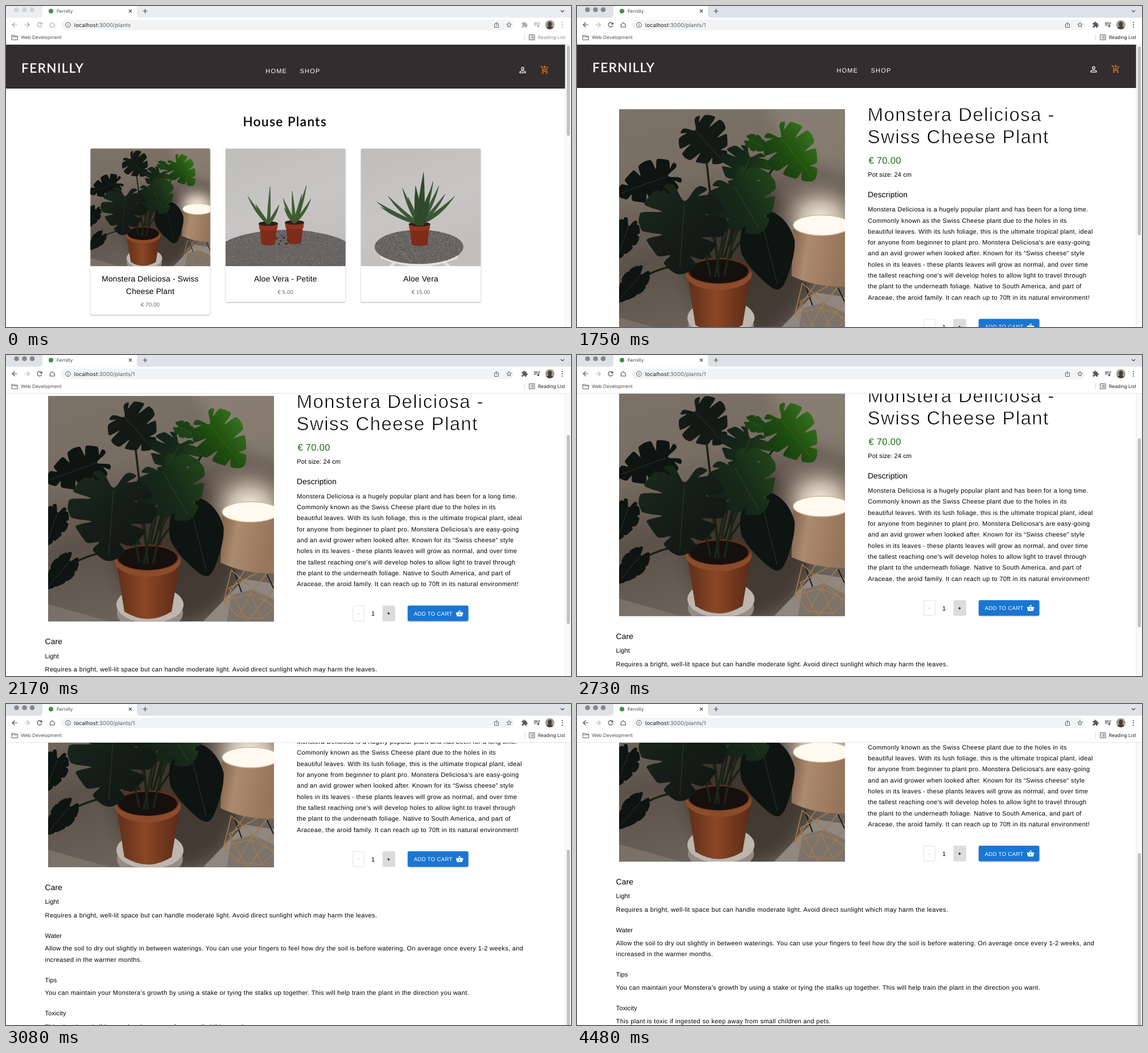
An HTML page for the animation above (4550 ms loop, 993 px wide and 564 px high).

```html
<!DOCTYPE html>
<html lang="en">
<head>
<meta charset="utf-8">
<title>Fernilly</title>
<style>
  html, body { margin: 0; width: 100%; height: 100%; overflow: hidden; background: #fff; }
  svg { display: block; width: 993px; height: 564px; }
  text { font: 11.03px "Liberation Sans", Arial, sans-serif; letter-spacing: .1px; text-rendering: geometricPrecision; white-space: pre; }
  .ui { font: 8.3px Inter, sans-serif; letter-spacing: 0; }
  .url { font: 9.66px Inter, sans-serif; letter-spacing: 0; fill: #5f6368; }
  .brand { font: 22.5px Lato, sans-serif; letter-spacing: 1.5px; stroke-width: .4; stroke-linejoin: round; }
  .nav { letter-spacing: 1.2px; fill: #fff; }
  .title { font-size: 33.1px; letter-spacing: 1.4px; stroke: #fff; stroke-width: .75; }
  .price { font-size: 16.5px; letter-spacing: .3px; fill: #176d10; }
  .head { font-size: 13.8px; }
  .body { letter-spacing: .345px; }
  .name { font-size: 13.8px; letter-spacing: .18px; text-anchor: middle; }
  .cost { font-size: 9.66px; text-anchor: middle; fill: #666; }
  .button { font-size: 9.66px; letter-spacing: .28px; fill: #fff; }
  .raised { filter: drop-shadow(0 1px 1px rgba(0,0,0,.32)); }
</style>
</head>
<body>
<svg id="stage" viewBox="0 0 993 564"></svg>
<script>
const LOOP = 4550, STEP = 70;
let seed = 7;
const random = () => (seed = seed * 16807 % 2147483647) / 2147483647;
const text = (x, y, string, cls = '', more = '') => `<text x="${x}" y="${y}" class="${cls}" ${more}>${string}</text>`;
const rect = (x, y, w, h, fill, more = '') => `<rect x="${x}" y="${y}" width="${w}" height="${h}" fill="${fill}" ${more}/>`;
const ellipse = (x, y, rx, ry, fill, more = '') => `<ellipse cx="${x}" cy="${y}" rx="${rx}" ry="${ry}" fill="${fill}" ${more}/>`;
const shape = (d, fill, more = '') => `<path d="${d}" fill="${fill}" ${more}/>`;
const line = (d, color, width = 1, more = '') => shape(d, 'none', `stroke="${color}" stroke-width="${width}" ${more}`);
const icon = (d, x, y, size, fill, more = '') =>
  shape(d, fill, `transform="translate(${x - size / 2} ${y - size / 2}) scale(${size / 24})" ${more}`);
const gradient = (id, stops, more = '', kind = 'linear') => `<${kind}Gradient id="${id}" ${more}>` +
  stops.map(([offset, color, alpha = 1]) => `<stop offset="${offset}" stop-color="${color}" stop-opacity="${alpha}"/>`).join('') +
  `</${kind}Gradient>`;

const ICONS = {
  back: 'M20 11H7.83l5.59-5.59L12 4l-8 8 8 8 1.41-1.41L7.83 13H20v-2z',
  forward: 'M12 4l-1.41 1.41L16.17 11H4v2h12.17l-5.58 5.59L12 20l8-8z',
  reload: 'M17.65 6.35C16.2 4.9 14.21 4 12 4c-4.42 0-8 3.58-8 8s3.58 8 8 8c3.73 0 6.84-2.55 7.73-6h-2.08c-.82 2.33-3.04 4-5.65 4-3.31 0-6-2.69-6-6s2.69-6 6-6c1.66 0 3.14.69 4.22 1.78L13 11h7V4z',
  home: 'M12 3L3 11v10h18V11zM5 12l7-6.3 7 6.3v7H5z',
  star: 'M22 9.24l-7.19-.62L12 2 9.19 8.63 2 9.24l5.46 4.73L5.82 21 12 17.27 18.18 21l-1.63-7.03zM12 15.4l-3.76 2.27 1-4.28-3.32-2.88 4.38-.38L12 6.1l1.71 4.04 4.38.38-3.32 2.88 1 4.28z',
  puzzle: 'M20.5 11H19V7a2 2 0 0 0-2-2h-4V3.5a2.5 2.5 0 0 0-5 0V5H4a2 2 0 0 0-2 2v3.8h1.5a2.7 2.7 0 0 1 0 5.4H2V20a2 2 0 0 0 2 2h3.8v-1.5a2.7 2.7 0 0 1 5.4 0V22H17a2 2 0 0 0 2-2v-4h1.5a2.5 2.5 0 0 0 0-5z',
  queue: 'M15 6H3v2h12zm0 4H3v2h12zM3 16h8v-2H3zM17 6v8.18a3 3 0 1 0 2 2.82V8h3V6z',
  person: 'M12 5.9a2.1 2.1 0 1 1 0 4.2a2.1 2.1 0 1 1 0-4.2m0 9c2.97 0 6.1 1.46 6.1 2.1v1.1H5.9V17c0-.64 3.13-2.1 6.1-2.1M12 4a4 4 0 1 0 0 8a4 4 0 1 0 0-8zm0 9c-2.67 0-8 1.34-8 4v3h16v-3c0-2.66-5.33-4-8-4z',
  cart: 'M11 9h2V6h3V4h-3V1h-2v3H8v2h3zM7 18a2 2 0 1 0 0 4a2 2 0 1 0 0-4zm10 0a2 2 0 1 0 0 4a2 2 0 1 0 0-4zM7.17 14.75l.93-1.75h7.45c.75 0 1.41-.41 1.75-1.03l3.86-7L19.42 4l-3.87 7H8.53L4.27 2H1v2h2l3.6 7.59-1.35 2.45C4.5 15.4 5.5 17 7 17h12v-2H7.42z',
  basket: 'M17.21 9l-4.38-6.56a1 1 0 0 0-1.66 0L6.79 9H2a1 1 0 0 0-.96 1.27l2.54 9.27A2 2 0 0 0 5.5 21h13a2 2 0 0 0 1.93-1.46l2.54-9.27A1 1 0 0 0 22 9zM9 9l3-4.4L15 9zm3 8a2 2 0 1 1 0-4a2 2 0 1 1 0 4z'
};

// Heart-shaped leaf pointing down before rotation; cut sets the depth of the slits.
function leaf(x, y, w, h, angle, color, cut = .5) {
  const points = [];
  for (let i = 0; i < 240; i++) {
    const a = i / 120 * Math.PI, s = Math.sin(a), c = Math.cos(a), tip = Math.max(c, 0);
    const slit = Math.abs(s) > .35 ? cut * Math.abs(Math.cos(5 * a)) ** 24 : 0;
    const px = s * (1 - .3 * tip) * (1 - slit);
    const py = (c + .15 * tip ** 6) * (1 - slit * .3) + .45 * Math.exp(-(((a - Math.PI) / .2) ** 2));
    points.push(`${(px * w).toFixed(1)} ${(py * h).toFixed(1)}`);
  }
  return `<g transform="translate(${x} ${y}) rotate(${angle})">` + shape(`M${points.join('L')}Z`, color) +
    line(`M0 ${-.5 * h}V${h}`, '#6f8a5f', .8, 'opacity=".35"') + '</g>';
}

function monstera() {
  const black = '#0e1411', deep = 'url(#deepLeaf)';
  return rect(0, 0, 397, 397, 'url(#wall)') +
    ellipse(230, 270, 110, 130, '#2a231d', 'opacity=".6" filter="url(#soft)"') +
    shape('M255 -20Q290 95 420 125V-20Z', '#93887c', 'opacity=".6" filter="url(#soft)"') +
    rect(180, 90, 217, 190, 'url(#glow)') +
    shape('M0 366L110 397H0Z', '#8d847b', 'opacity=".5"') +
    shape('M272 397L345 322L397 330V397Z', '#8f8780') +
    shape('M314 397L322 350L360 340L397 358V397Z', '#7b736c') +
    line('M326 306L340 345M384 312L397 340', '#1c1613', 2) +
    line('M322 306L309 360L334 388L376 392L397 372M322 306L397 372M346 306L309 360L355 348L397 368M355 348L334 388M376 306L318 338L350 397L397 338M390 306L355 348L376 392', '#a07a4f', 1.8) +
    shape('M306 203L303 293Q345 313 397 312V203Z', 'url(#shade)') +
    ellipse(356, 204, 50, 18, '#fffaf0', 'stroke="#cdb698" stroke-width="1.5"') +
    ellipse(179, 382, 58, 31, '#958c85') + ellipse(179, 367, 59, 32, '#bdb5ae') +
    line('M175 280Q165 190 150 60M178 280Q210 170 300 70M176 285Q190 190 225 100M170 285Q130 190 57 120M182 282Q220 210 255 200M170 282Q150 230 112 180M165 280Q90 260 28 305M182 275Q205 190 215 130M160 275L140 225M195 275L200 205', '#182015', 3.5) +
    shape('M121 296L134 379Q175 405 217 379L231 296Z', 'url(#clay)') +
    ellipse(175, 290, 58, 28, '#8c4b2b') + ellipse(175, 284, 55, 23, '#5f301b') + ellipse(175, 285, 52, 21, '#15100d') +
    line('M160 292Q155 250 130 215M175 295Q172 240 160 205M185 294Q195 240 210 210M168 295Q178 250 184 215', '#1b2518', 4) +
    leaf(150, 55, 46, 44, -42, '#131a15') + leaf(240, 60, 15, 22, -65, '#1c4215', .2) +
    leaf(222, 103, 48, 38, 25, 'url(#midLeaf)') + leaf(303, 74, 46, 56, -38, 'url(#brightLeaf)', .55) +
    leaf(57, 128, 38, 56, 70, black) + leaf(10, 224, 25, 36, 20, black, .2) +
    leaf(262, 243, 48, 66, -14, black, 0) + leaf(217, 160, 66, 57, -30, 'url(#midLeaf)', .4) +
    leaf(112, 203, 78, 76, 4, deep) + leaf(25, 306, 22, 37, 40, black, .1);
}

function speckles(x, y, rx, ry) {
  let light = '', shadow = '';
  for (let i = 0; i < 900; i++) {
    const a = random() * 2 * Math.PI, r = Math.sqrt(random());
    const dot = `M${(x + rx * r * Math.cos(a)).toFixed(1)} ${(y + ry * r * Math.sin(a)).toFixed(1)}h1.3`;
    if (i % 2) light += dot; else shadow += dot;
  }
  return ellipse(x, y, rx, ry, '#696564') + line(light, '#8d8988') + line(shadow, '#4b4747');
}

function blade(x, y, tipX, tipY, w, color) {
  const mx = x + (tipX - x) * .6, my = y + (tipY - y) * .45, bend = (tipX < x ? 1 : -1) * w * .8;
  return shape(`M${x - w} ${y}Q${mx - w} ${my + bend} ${tipX} ${tipY}Q${mx + w} ${my - bend} ${x + w} ${y}Z`,
    color, 'stroke="#294126" stroke-width=".5"');
}
const aloe = (x, y, w, color, tips) => tips.map(([tipX, tipY]) => blade(x, y, tipX, tipY, w, color)).join('');
const pot = (x, y, w) =>
  shape(`M${x - w + 2} ${y + 6}L${x - w + 5} ${y + 36}Q${x} ${y + 41} ${x + w - 5} ${y + 36}L${x + w - 2} ${y + 6}Z`, '#7f2b19') +
  shape(`M${x - w} ${y}L${x - w + 1.5} ${y + 10}Q${x} ${y + 14} ${x + w - 1.5} ${y + 10}L${x + w} ${y}Z`, '#92341f') +
  ellipse(x, y, w, 4, '#2d201a');

const petite = () => rect(0, 0, 211, 207, 'url(#plaster)') + speckles(106, 190, 128, 47) +
  pot(75, 132, 17) + pot(121, 130, 17) +
  line('M88 158h4M95 162h3M100 157h5M108 161h4M92 168h3M104 167h5M98 153h2', '#2f2723', 2.2) +
  aloe(75, 133, 2.8, '#40602f', [[39, 84], [53, 98], [78, 67], [94, 99]]) +
  aloe(121, 131, 2.8, '#40602f', [[101, 88], [117, 75], [103, 104], [142, 65], [150, 89], [134, 80]]);

const classic = () => rect(0, 0, 211, 207, 'url(#plaster)') +
  line('M35 190Q102 220 170 190M60 199L50 210M145 199L158 210', '#e3e1df', 5) +
  speckles(102, 173, 78, 30) + pot(103, 133, 19) +
  aloe(103, 134, 3.4, '#3d5937', [[28, 94], [48, 84], [35, 103], [165, 84], [155, 97], [148, 80], [73, 70], [83, 86], [137, 66], [127, 58]]) +
  aloe(103, 135, 6.5, '#2f4a2a', [[110, 42], [96, 66], [121, 76]]);

function card(x, photo, names, price, hover) {
  const bottom = 497.6 + 22.4 * names.length, middle = x + 105.3;
  return rect(x, 250.3, 210.6, bottom - 250.3, '#fff', 'rx="3" class="raised"') +
    (hover ? rect(x, 450, 210.6, bottom - 450, '#eef0f2', 'rx="3" id="hover"') : '') +
    `<g transform="translate(${x} 250.3)" clip-path="url(#cardClip)">${photo}</g>` +
    names.map((name, i) => text(middle, 483.6 + 22.2 * i, name, 'name')).join('') +
    text(middle, 483.4 + 22.2 * names.length, price, 'cost');
}
const gallery = () => text(416.5, 211, 'House Plants', 'brand', 'stroke="#000"') +
  card(148.2, '<use href="#monstera" transform="translate(0 -1.7) scale(.5305)"/>', ['Monstera Deliciosa - Swiss', 'Cheese Plant'], '€ 70.00', true) +
  card(386, petite(), ['Aloe Vera - Petite'], '€ 5.00') +
  card(623.8, classic(), ['Aloe Vera'], '€ 15.00');

const description = [
  'Monstera Deliciosa is a hugely popular plant and has been for a long time.',
  'Commonly known as the Swiss Cheese plant due to the holes in its',
  'beautiful leaves. With its lush foliage, this is the ultimate tropical plant, ideal',
  "for anyone from beginner to plant pro. Monstera Deliciosa's are easy-going",
  'and an avid grower when looked after. Known for its “Swiss cheese” style',
  'holes in its leaves - these plants leaves will grow as normal, and over time',
  "the tallest reaching one's will develop holes to allow light to travel through",
  'the plant to the underneath foliage. Native to South America, and part of',
  'Araceae, the aroid family. It can reach up to 70ft in its natural environment!'
];
const care = [
  [619, 'Care', 'head'], [643.4, 'Light'],
  [667, 'Requires a bright, well-lit space but can handle moderate light. Avoid direct sunlight which may harm the leaves.', 'body'],
  [703, 'Water'],
  [725.8, 'Allow the soil to dry out slightly in between waterings. You can use your fingers to feel how dry the soil is before watering. On average once every 1-2 weeks, and', 'body'],
  [745, 'increased in the warmer months.', 'body'],
  [781, 'Tips'],
  [803.5, 'You can maintain your Monstera’s growth by using a stake or tying the stalks up together. This will help train the plant in the direction you want.', 'body'],
  [839.5, 'Toxicity'],
  [863, 'This plant is toxic if ingested so keep away from small children and pets.', 'body']
];
const detail = () => '<g transform="translate(74 182.4)" clip-path="url(#photoClip)"><use href="#monstera"/></g>' +
  text(510.5, 203.7, 'Monstera Deliciosa -', 'title') + text(510.5, 242.3, 'Swiss Cheese Plant', 'title') +
  text(512.5, 278.6, '€ 70.00', 'price') + text(511.3, 301.3, 'Pot size: 24 cm') + text(511, 337.6, 'Description', 'head') +
  description.map((row, i) => text(511.3, 362.5 + 19.31 * i, row, 'body')).join('') +
  rect(609.5, 551.5, 20, 26.6, '#fff', 'rx="2.5" stroke="#e0e0e0"') + text(617.5, 568.5, '-', '', 'fill="#aaa"') +
  text(642, 569, '1') +
  rect(661.5, 551, 22.5, 27.5, '#dcdcdc', 'rx="2.5"') + text(669.8, 568, '+', '', 'style="font-size:9px;font-weight:bold"') +
  rect(706, 551, 106.5, 27.3, '#1976d2', 'rx="2.8" class="raised"') + text(716.8, 568.5, 'ADD TO CART', 'button') +
  icon(ICONS.basket, 797.2, 564.8, 13.8, '#fff') +
  care.map(([y, row, cls]) => text(68.6, y, row, cls)).join('');

const header = () => rect(0, 60, 983, 85, '#322e2f') + rect(0, 144, 983, 1, '#1f1c1d') +
  text(27, 117, 'FERNILLY', 'brand', 'fill="#fff" stroke="#fff"') +
  text(456.3, 118, 'HOME', 'nav') + text(516.5, 118, 'SHOP', 'nav') +
  icon(ICONS.person, 908, 112.5, 16.5, '#fff') + icon(ICONS.cart, 946.8, 112, 16.5, '#e8741c');

const browser = () => rect(0, 0, 993, 68, '#fff') + rect(0, 0, 993, 20.5, '#dee1e6', 'id="strip"') +
  '<g id="lights">' + [18.5, 32.5, 46].map(x => ellipse(x, 6.5, 4.3, 4.3, '#85878a')).join('') + '</g>' +
  shape('M58 20.5Q64 20.5 64 14V0H230V14Q230 20.5 236 20.5Z', '#fff') +
  ellipse(79, 9, 4, 4, '#3f8f45') + text(89, 12, 'Fernilly', 'ui', 'fill="#45494d"') +
  line('M216 6.5l5 5m0-5l-5 5M240.5 9h8m-4-4v8M975 7.5l3 3 3-3', '#45494d', 1.2) +
  rect(97, 24, 795, 18.5, '#f1f3f4', 'rx="9.25"') +
  ellipse(109, 33.2, 4.4, 4.4, 'none', 'stroke="#5f6368"') + line('M109 32.5v3M109 30.4v1.1', '#5f6368', 1.1) +
  text(119.8, 36.6, '<tspan fill="#202124">localhost</tspan>:3000/plants<tspan id="path"></tspan>', 'url') +
  line('M860 31.5h-1.5v6h7v-6H864M862 35v-6m-2 2l2-2 2 2', '#5f6368') + icon(ICONS.star, 884, 33, 12, '#5f6368') +
  '<g id="focus">' + icon(ICONS.back, 15, 33, 14.5, '#45494d') + icon(ICONS.forward, 37.3, 33, 14.5, '#45494d', 'id="forward"') +
  icon(ICONS.reload, 59, 33, 13.5, '#45494d') + icon(ICONS.home, 81.3, 33, 12, '#45494d') +
  icon(ICONS.puzzle, 911.5, 33, 12, '#55595d') + icon(ICONS.queue, 933, 32.5, 14, '#55595d') +
  [29, 33, 37].map(y => ellipse(977.8, y, 1.1, 1.1, '#45494d')).join('') +
  text(934.8, 58, 'Reading List', 'ui', 'fill="#202124"') + '</g>' +
  ellipse(955.8, 33, 8, 8, '#9a9f91') + shape('M949.5 38Q956 33 962 38A8 8 0 0 1 949.5 38Z', '#4b3a35') + ellipse(955.8, 32, 3.6, 4.6, '#4b3a35') +
  line('M10 51.5h4l1 1.5h5.5v6.5H10ZM10 54h10.5', '#5f6368') + text(26, 58, 'Web Development', 'ui', 'fill="#4d5155"') +
  line('M911.5 50v11', '#d5d7da') +
  line('M919.5 50.5h9.5v9h-9.5ZM921 53h1m1.2 0h4.3M921 55h1m1.2 0h4.3M921 57h1m1.2 0h4.3', '#5f6368') +
  rect(0, 67.2, 993, .8, '#dcdee1');

const stage = document.getElementById('stage');
stage.innerHTML = '<defs>' +
  gradient('wall', [[0, '#7d7268'], [.35, '#786d63'], [.65, '#5c5249'], [1, '#6b625a']], 'x2=".3" y2="1"') +
  gradient('glow', [[0, '#fff6e8'], [.35, '#ddd0c0', .8], [.7, '#a89a8c', .35], [1, '#8b7f74', 0]], 'cx=".8" cy=".55" r=".45"', 'radial') +
  gradient('shade', [[0, '#7a5d47'], [.35, '#ab8a6d'], [1, '#96755a']], 'y2=".2"') +
  gradient('clay', [[0, '#5f2f19'], [.45, '#8a4726'], [1, '#5a2a16']]) +
  gradient('deepLeaf', [[0, '#1a2a1c'], [.5, '#141d18'], [1, '#101613']], 'y2="1"') +
  gradient('midLeaf', [[0, '#13201a'], [.5, '#172a18'], [1, '#20451a']]) +
  gradient('brightLeaf', [[0, '#173a12'], [.5, '#21520f'], [1, '#35701f']]) +
  gradient('plaster', [[0, '#bebdbc'], [.6, '#c8c6c5'], [1, '#c1bfbd']], 'x2=".4" y2="1"') +
  '<filter id="soft" x="-30%" y="-30%" width="160%" height="160%"><feGaussianBlur stdDeviation="14"/></filter>' +
  '<clipPath id="pageClip"><rect y="68" width="983" height="496"/></clipPath>' +
  '<clipPath id="photoClip"><rect width="397" height="396.7"/></clipPath>' +
  '<clipPath id="cardClip"><path d="M0 207V3Q0 0 3 0H207.6Q210.6 0 210.6 3V207Z"/></clipPath>' +
  `<g id="monstera">${monstera()}</g></defs>` + rect(0, 0, 993, 564, '#fff') +
  `<g clip-path="url(#pageClip)"><g id="page">${header()}<g id="gallery">${gallery()}</g><g id="detail">${detail()}</g></g></g>` +
  rect(983, 68, 10, 496, '#fafafa') + rect(982.5, 68, .8, 496, '#e6e6e6') +
  rect(985.5, 70, 5.6, 158, '#c1c1c1', 'rx="2.8" id="thumb"') + browser();

const set = (id, name, value) => document.getElementById(id).setAttribute(name, value);
const progress = (t, from, to) => Math.min(1, Math.max(0, (t - from) / (to - from)));
const smooth = p => p * p * (3 - 2 * p);

function draw() {
  const t = Math.floor(performance.now() % LOOP / STEP) * STEP;
  const focus = progress(t, 210, 560), opened = t >= 1120;
  const scroll = 112 * smooth(progress(t, 1720, 2200)) + 190 * smooth(progress(t, 2670, 3145));

  set('strip', 'opacity', .6 + .4 * focus);
  set('lights', 'opacity', .25 + .75 * focus);
  set('focus', 'opacity', .5 + .5 * focus);
  set('forward', 'opacity', opened ? .4 : 1);
  document.getElementById('path').textContent = opened ? '/1' : '';
  set('hover', 'opacity', progress(t, 840, 1050));
  set('gallery', 'display', opened ? 'none' : 'inline');
  set('detail', 'display', opened ? 'inline' : 'none');
  set('page', 'transform', `translate(0 ${-scroll})`);
  set('thumb', 'y', 70 + scroll * .636);
  set('thumb', 'height', opened ? 332 : 158);
  requestAnimationFrame(draw);
}
draw();
</script>
</body>
</html>
```
